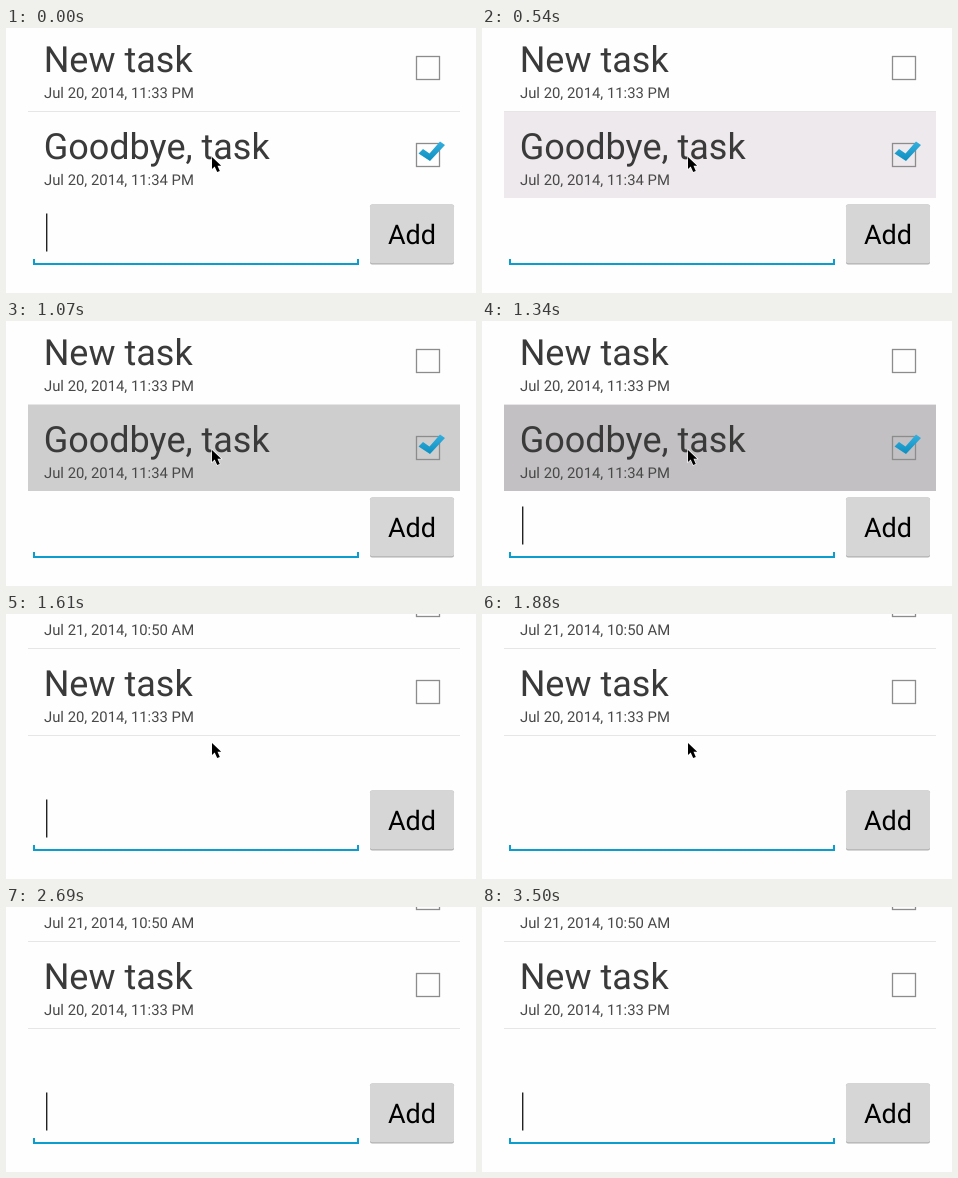
An HTML page that plays this animation: 470 px wide and 265 px high, repeating every 3550 ms.

```html
<!DOCTYPE html>
<html lang="en">
<head>
<meta charset="utf-8">
<title>Task list</title>
<style>
  html, body { margin: 0; width: 100%; height: 100%; overflow: hidden; background: #fefefe; }
  svg { display: block; font-family: Roboto, sans-serif; text-rendering: geometricPrecision; }
  .title { font-size: 36px; fill: #3a3a3a; }
  .date { font-size: 14.85px; fill: #484848; }
  .box { fill: none; stroke: #8c8c8c; stroke-width: 1.3; }
  .rule { fill: #e6e6e6; }
</style>
</head>
<body>
<svg width="470" height="265" viewBox="0 0 470 265">
  <defs>
    <linearGradient id="blue" x2="0" y2="1">
      <stop stop-color="#35b0de"/>
      <stop offset="1" stop-color="#0d8fc0"/>
    </linearGradient>
  </defs>
  <g id="list"></g>
  <path d="M28 231V236H352V231" fill="none" stroke="#0a9dcd" stroke-width="2"/>
  <rect id="caret" x="40" y="185.5" width="1.4" height="38" fill="#222"/>
  <rect x="364" y="176.5" width="84" height="60" rx="2" fill="#b0b0b0"/>
  <rect x="364" y="176.5" width="84" height="58.8" rx="2" fill="#d6d6d6"/>
  <text x="382" y="216" font-size="27" fill="#000">Add</text>
  <path id="pointer" d="M0 0V12L2.7 9.5 5.2 15 7.8 13.9 5.5 8.7H9.2Z"
        fill="#000" stroke="#fff" stroke-width="1.2" paint-order="stroke"/>
</svg>
<script>
const LOOP = 3550;
const $ = id => document.getElementById(id);

// Steps are [start time, value]; each value holds until the next start.
const highlight = [[0, "none"], [540, "#eee9ec"], [800, "#dddddd"], [1070, "#cfcecf"], [1340, "#c2c0c2"]];
const caret = [[0, 1], [540, 0], [1340, 1], [1880, 0], [2420, 1], [2960, 0], [3500, 1]];
const pointer = [[0, [206, 129]], [2150, [377, 217]], [2420, [431, 262]], [2690, [480, 280]]];
const DELETED_AT = 1610;

const at = (steps, t) => steps.filter(([start]) => start <= t).pop()[1];

const row = (y, title, date, { fill = "none", checked = false, rule = true } = {}) => `
  <g transform="translate(0 ${y})">
    <rect x="22" y="-3" width="432" height="86" fill="${fill}"/>
    <text class="title" x="37.7" y="44.4">${title}</text>
    <text class="date" x="38" y="70">${date}</text>
    <rect class="box" x="410.5" y="28.5" width="23" height="23"/>
    ${checked ? `<path d="M412.5 38.5L417 34 423.5 38.5 434 26.5 439 30 424 46Z" fill="url(#blue)"/>` : ""}
    ${rule ? `<rect class="rule" x="22" y="83" width="432" height="1"/>` : ""}
  </g>`;

const newTask = y => row(y, "New task", "Jul 20, 2014, 11:33 PM");

function listAt(t) {
  if (t >= DELETED_AT) return row(-49, "", "Jul 21, 2014, 10:50 AM") + newTask(38);
  const state = { fill: at(highlight, t), checked: true, rule: false };
  return newTask(0) + row(87, "Goodbye, task", "Jul 20, 2014, 11:34 PM", state);
}

let shown = "";
function draw(now) {
  const t = now % LOOP;
  const list = listAt(t);
  if (list !== shown) $("list").innerHTML = shown = list;
  $("caret").setAttribute("opacity", at(caret, t));
  $("pointer").setAttribute("transform", `translate(${at(pointer, t)})`);
}

const start = performance.now();
function tick() {
  draw(performance.now() - start);
  requestAnimationFrame(tick);
}
tick();
</script>
</body>
</html>
```
